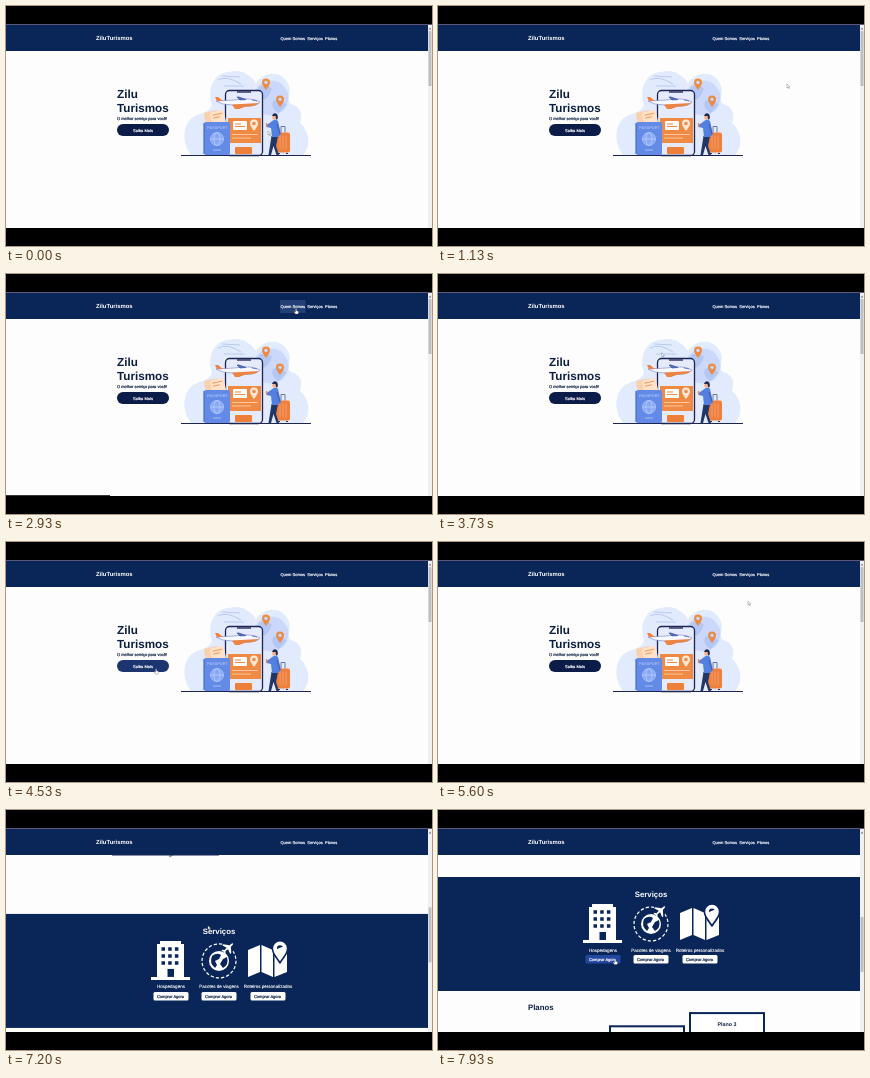
Animation, 426 px wide and 240 px high, one loop 8000 ms. Source, as an HTML page:

```html
<!DOCTYPE html>
<html lang="pt-BR">
<head>
<meta charset="utf-8">
<title>ZiluTurismos</title>
<style>
  html, body { margin: 0; height: 100%; overflow: hidden; background: #000; }
  svg { display: block; width: 100vw; height: 100vh; font-family: "Liberation Sans", Arial, sans-serif; text-rendering: geometricPrecision; }
  .b { font-weight: bold; }
  .mid { text-anchor: middle; }
  .navy { fill: #0a2558; }
  .ink { fill: #0c1f42; }
  .white { fill: #fff; }
  .line { fill: none; stroke: #1b2550; }
  .small { font-size: 4px; stroke-width: .18; }
  .small.ink, #about { stroke: #0c1f42; }
  .small.white { stroke: #fff; }
  .link rect { fill: transparent; }
  .link.hover rect { fill: #233f75; }
  .cta rect { fill: #0c1c48; }
  .cta.hover rect { fill: #1c3470; }
  .buy rect { fill: #fff; }
  .buy text { fill: #0c1f42; stroke: #0c1f42; }
  .buy.hover rect { fill: #23469f; }
  .buy.hover text { fill: #fff; stroke: #fff; }
</style>
</head>
<body>
<svg viewBox="0 0 426 240">
  <defs>
    <path id="pin" d="M0 6C-2 3-4 1-4-1.500A4 4 0 0 1 4-1.500C4 1 2 3 0 6ZM0-3.300A1.800 1.800 0 1 0 0 .300A1.800 1.800 0 1 0 0-3.300Z"/>
    <path id="jet" d="M0-7Q1.200-6 1-3L6 1V2.500L1 .800.700 4 2.500 5.500V6.500L0 5.800-2.500 6.500V5.500L-.700 4-1 .800-6 2.500V1L-1-3Q-1.200-6 0-7Z"/>
    <g id="case">
      <path d="M5 0V-6H9V0" fill="none" stroke="#555b73" stroke-width=".8"/>
      <rect width="14" height="20" rx="2"/>
      <path d="M4 3V17M7 3V17M10 3V17" stroke="#fff" stroke-opacity=".35" stroke-width=".7"/>
      <path d="M3 20.500V21.500M11 20.500V21.500" stroke="#263152" stroke-width="2"/>
    </g>
  </defs>

  <rect y="18" width="426" height="205" fill="#fdfdfd"/>

  <g id="page">
    <!-- hero -->
    <g class="b ink" font-size="11.7">
      <text x="111" y="92.300">Zilu</text>
      <text x="111" y="105.500">Turismos</text>
    </g>
    <text class="ink small" x="111" y="114">O melhor serviço para você!</text>
    <g class="cta" data-box="111 118 52 12">
      <rect x="111" y="118" width="52" height="12" rx="6"/>
      <text class="white mid small" x="137" y="125.500">Saiba Mais</text>
    </g>

    <g fill="#e1ebfd">
      <path d="M185 149C177 138 176 125 183 115C190 106 202 109 206 99C201 83 207 67 223 66C235 62 246 70 250 77C257 66 274 64 281 76C288 86 279 93 285 98C297 101 296 112 294 117C304 126 305 140 297 149Z"/>
      <circle cx="265" cy="92" r="17.500" fill="#cbd8f9"/>
      <path d="M253 81Q262 77 266 83Q263 91 258 94Q251 90 253 81ZM267 95Q275 92 280 99L273 107Q264 103 267 95Z" fill="#b3c7f5"/>
      <path d="M212 74Q221 69 235 78M216 70 234 71M218 80H238" fill="none" stroke="#8ea9e4" stroke-width=".5"/>
    </g>
    <rect x="219.500" y="84.500" width="37" height="65" rx="4" fill="#e6eafd"/>
    <path d="M222 112H255V137H222Z" fill="#ef8a45"/>
    <rect x="227" y="115" width="14" height="9" rx="1" class="white"/>
    <path d="M229 118H235M229 120.500H239" stroke="#ef8a45" stroke-width="1.200"/>
    <use href="#pin" x="248" y="119" fill="#fde6d3" fill-rule="evenodd"/>
    <path d="M226 128.500H252M226 132H245" stroke="#fbc6a0" stroke-width="1"/>
    <rect x="229" y="141" width="17" height="7" rx="1" fill="#ec8038"/>
    <rect class="line" x="219.500" y="84.500" width="37" height="65" rx="4" stroke-width="1.300"/>
    <path d="M231 86H245" class="line" stroke-width="1.300"/>
    <path d="M210 95 228 94Q246 91 254 96Q251 100 240 100.500L217 98Z" fill="#f7f8ff" stroke="#5871b4" stroke-width=".5"/>
    <path d="M226 98.500 253 97Q250 100.500 240 100.500L233 103 229 103ZM211 95 209 91 212 91 217 95Z" fill="#ec8244"/>
    <path d="M234 94 231 91 233 91 240 93.500ZM246 94 251 95" fill="#5871b4" stroke="#2c458e" stroke-width=".6"/>

    <g transform="rotate(-12 208 112)" fill="#fbd0aa">
      <rect x="199" y="105" width="14" height="17" rx="1"/>
      <rect x="205" y="106" width="14" height="17" rx="1" fill="#fde1c8"/>
      <path d="M207 109H217M207 112H214" stroke="#ec8c4c" stroke-width=".8"/>
    </g>
    <rect x="198" y="116" width="26" height="33" rx="2" fill="#628ae6"/>
    <path d="M198 117V148" stroke="#456bc4" stroke-width="1.200"/>
    <text class="mid" x="211.500" y="122.500" font-size="3.800" fill="#c9d8fc">PASSPORT</text>
    <g fill="none" stroke="#bfd2ff" stroke-width=".7">
      <circle cx="211" cy="133" r="6.500" fill="#87a8f2"/>
      <ellipse cx="211" cy="133" rx="3" ry="6.500"/>
      <path d="M204.500 133H217.500M207 144H215"/>
    </g>
    <g fill="#ec8b43" fill-rule="evenodd">
      <use href="#pin" x="260" y="78"/>
      <use href="#pin" x="274" y="95"/>
    </g>
    <use href="#case" x="270" y="126.500" fill="#ef7f3c"/>
    <path d="M265.500 130H272L270 140 273 149H270.500L267.500 140 265 149H262.500Z" fill="#223769"/>
    <path d="M265 116Q269 112 272 115L275 128 272 131H266L265 122 260.500 121 260.500 119Z" fill="#5380df"/>
    <path d="M271 118 274 128" stroke="#365fb8"/>
    <circle cx="268.500" cy="111.500" r="2.300" fill="#f1b092"/>
    <path d="M266 110Q267 106 271 108Q273 112 270.500 114L269.500 110Z" fill="#202a4c"/>
    <path d="M260.500 117V121" stroke="#ef8a45" stroke-width="1.200"/>
    <path class="line" d="M175 149.500H305"/>

    <!-- about, placed 150 below its on-screen position -->
    <g transform="translate(0 150)">
      <path d="M117 173Q110 158 123 146C134 140 129 127 142 121C159 111 177 119 185 127C204 130 216 151 209 173Z" fill="#e8f0fd"/>
      <path d="M157 115V147" stroke="#7e99c4" stroke-width=".7"/>
      <path d="M142 121H172V128H142ZM142 129.500H172V136.500H142Z" fill="#4c70ad"/>
      <path d="M144 124.500H160M144 133H163" stroke="#d7e5fb" stroke-width="1.500"/>
      <path d="M163 124.500H170M166 133H170" stroke="#f0a24d" stroke-width="1.300"/>
      <path d="M139 152V146Q144 140 150 146V152Z" fill="#3d78ce"/>
      <circle cx="144.500" cy="139" r="2.700" fill="#f0b194"/>
      <path d="M141.500 139Q142 134 147 136L147.500 139Z" fill="#c16233"/>
      <rect x="118" y="150" width="50" height="23" fill="#669ce5"/>
      <path d="M116 150.500H169" stroke="#2e5c9c" stroke-width="1.600"/>
      <path d="M128 156H162V169H128Z" fill="#4e87d6"/>
      <path d="M150 149V142H163V149Z" fill="#3a5c8c"/>
      <path d="M118 156H124.500L123.500 173H121.500L121 161 120 173H117.500Z" fill="#263452"/>
      <path d="M118 157V146Q121 141 124 146L128.500 151 127 152.500 123.500 150V157Z" fill="#f0a33f"/>
      <circle cx="121" cy="138.500" r="2.500" fill="#8b513c"/>
      <use href="#case" transform="translate(107 158) scale(.7)" fill="#e98442"/>
      <use href="#case" transform="translate(163 157) rotate(24) scale(.75)" fill="#82c473"/>
      <path d="M175 151H184L182 161 187 173H184.500L179 160 175.500 173H173Z" fill="#24355b"/>
      <path d="M175.500 152V142Q180 137 185 142L184.500 152ZM176 143 172 153 173 156 178 146Z" fill="#b83b42"/>
      <circle cx="180.500" cy="134" r="2.700" fill="#e9a47f"/>
      <path d="M178 134Q178 129 183.500 132L181 133Z" fill="#2c2d43"/>
      <path d="M189 155H197L196 162 200 172H198L193 162 191 173H188.500Z" fill="#34578f"/>
      <path d="M189 156V146Q193 142 197 147L202 143 203 144.500 197 151V157Z" fill="#f1c767"/>
      <circle cx="193" cy="140" r="2.500" fill="#edb091"/>
      <path d="M190 144Q189 136 194 137L195 139 192 140Z" fill="#4a2c34"/>
      <path class="line" d="M106 173.300H213" stroke-width=".7"/>
      <rect x="218" y="115" width="2" height="13" fill="#124a4d"/>
      <text class="b ink" x="221.700" y="122.600" font-size="7.800">Quem somos</text>
      <g id="about" font-size="3.900" stroke-width=".18"></g>
    </g>

    <!-- services and plans, placed 315 below their on-screen position -->
    <g transform="translate(0 315)">
      <rect class="navy" y="67" width="422" height="114"/>
      <text class="white b mid" x="213" y="87" font-size="7.800">Serviços</text>
      <g class="white">
        <path d="M151 97H154V94H175V97H178V130H184V133H145V130H151Z"/>
        <path d="M155.500 102H173M155.500 109H173M155.500 116H173" fill="none" stroke="#0a2558" stroke-width="3.500" stroke-dasharray="3.500 3.200"/>
        <path class="navy" d="M161.500 122H168V130H161.500Z"/>
        <circle cx="213" cy="114" r="17" fill="none" stroke="#fff" stroke-width="1.200" stroke-dasharray="3.300 2"/>
        <circle cx="213" cy="114" r="10"/>
        <path class="navy" d="M206 109Q211 105 215 108L213 112 209 114 211 118 209 121Q203 116 206 109ZM217 112 221 110Q223 118 217 121L214 117Z"/>
        <circle class="navy" cx="222" cy="101" r="6"/>
        <use href="#jet" transform="translate(222 101) rotate(48)"/>
        <path d="M242 103 254 98V125L242 130ZM255.500 98 267 103V130L255.500 125ZM268.500 103 281 98V125L268.500 130Z"/>
        <use href="#pin" class="navy" transform="translate(274 105) scale(2.050)"/>
        <use href="#pin" fill-rule="evenodd" transform="translate(274 104) scale(1.700)"/>
      </g>
      <g id="services"></g>
      <text class="b ink" x="90" y="200" font-size="7.800">Planos</text>
      <g id="plans" fill="#fff" stroke="#0a2558" stroke-width="2"></g>
    </g>
  </g>

  <rect class="navy" y="19" width="422" height="26"/>
  <text class="white b" x="90" y="34" font-size="5.900">ZiluTurismos</text>
  <g id="nav"></g>

  <rect x="422" y="19" width="4" height="204" fill="#f0f0f0"/>
  <path d="M424 21.500 425.300 23.500H422.700Z" fill="#777"/>
  <rect id="thumb" x="422.500" y="25" width="3" height="55" fill="#bfbfc1"/>
  <rect id="status" y="221" width="104" height="1" fill="#34363c"/>

  <path d="M0 0H426V18H0ZM0 222H426V240H0Z"/>
  <path d="M0 18.500H426" stroke="#5f567a"/>

  <g id="cursor" stroke-linejoin="round" fill="#fff" stroke="#555" stroke-width=".4">
    <path id="arrow" transform="scale(.8)" d="M0 0V5L1.200 4 2.100 5.900 2.900 5.500 2 3.700H3.600Z"/>
    <path id="hand" transform="scale(.85)" d="M-.500 0Q.200-.700.700 0V2.200L3 2.800V4.500L2.200 6H-.700L-2.200 3.500-1.500 3-.500 3.800Z"/>
  </g>
</svg>
<script>
const $ = id => document.getElementById(id);

$("about").innerHTML = [
  [136.3, "It is a long established fact that a reader will be"],
  [140.9, "distracted by the readable content of a page when"],
  [145.5, "looking at its layout."],
  [152.6, "The point of using Lorem Ipsum is that it has a more-"],
  [157.2, "or-less normal distribution of letters, as opposed to"],
  [161.8, "using 'Content here, content here', making it look like"],
  [166.4, "readable English."]
].map(([y, line]) => `<text x="218" y="${y}">${line}</text>`).join("");

$("services").innerHTML = [
  [165, "Hospedagens"], [213, "Pacotes de viagens"], [262, "Roteiros personalizados"]
].map(([x, name]) => `
  <text class="white mid" x="${x}" y="141.5" font-size="4.5" stroke="#fff" stroke-width=".12">${name}</text>
  <g class="buy" data-box="${x - 17.5} 460 35 9">
    <rect x="${x - 17.5}" y="145" width="35" height="8.5" rx="1.5"/>
    <text class="mid small" x="${x - 0.5}" y="150.8">Comprar Agora</text>
  </g>`).join("");

$("plans").innerHTML = [0, 1, 2].map(i => {
  const x = 92 + 80 * i, y = 229.5 - 13.2 * i;
  return `<rect x="${x}" y="${y}" width="74" height="100"/>
    <text class="b ink mid" x="${x + 37}" y="${y + 12.5}" font-size="5.3" stroke="none">Plano ${i + 1}</text>`;
}).join("");

$("nav").innerHTML = [
  [274.5, 25, "Quem Somos"], [301.3, 16, "Serviços"], [319, 13, "Planos"]
].map(([x, w, label]) => `
  <g class="link" data-fixed="1" data-box="${x - 0.5} 26 ${w + 0.5} 13">
    <rect x="${x - 0.5}" y="26" width="${w + 0.5}" height="13"/>
    <text class="white small" x="${x}" y="34">${label}</text>
  </g>`).join("");

const hotspots = [...document.querySelectorAll("[data-box]")].map(el => ({
  el, fixed: el.dataset.fixed, box: el.dataset.box.split(" ").map(Number)
}));

const LOOP = 8000;
// Each key is [time, ...values].
const cursorPath = [
  [0, 262, 125], [300, 262, 125], [1000, 349, 78], [1500, 349, 78],
  [2500, 290, 35], [3200, 290, 35], [4300, 150, 127], [4750, 150, 127],
  [5500, 310, 59], [5750, 310, 59], [6300, 212, 102], [6900, 212, 102],
  [7750, 177, 149.5], [LOOP, 177, 149.5]
];
const scrollPath = [[0, 0], [5750, 0], [6300, 150], [6750, 150], [7400, 315], [LOOP, 315]];

function sample(keys, t) {
  const i = keys.findIndex(key => key[0] > t);
  const [t0, ...from] = keys[i - 1], [t1, ...to] = keys[i];
  const u = (t - t0) / (t1 - t0), k = u * u * (3 - 2 * u);
  return from.map((v, j) => v + (to[j] - v) * k);
}

function draw() {
  const t = performance.now() % LOOP;
  const [x, y] = sample(cursorPath, t);
  const [scroll] = sample(scrollPath, t);
  let active = null;
  for (const { el, fixed, box: [bx, by, w, h] } of hotspots) {
    const top = fixed ? by : by - scroll;
    const over = x >= bx && x <= bx + w && y >= top && y <= top + h;
    el.classList.toggle("hover", over);
    if (over) active = el;
  }
  $("page").setAttribute("transform", `translate(0 ${-scroll})`);
  $("thumb").setAttribute("y", 25 + scroll * 0.26);
  $("cursor").setAttribute("transform", `translate(${x} ${y})`);
  $("arrow").style.display = active ? "none" : "";
  $("hand").style.display = active ? "" : "none";
  $("status").style.display = active && active.dataset.fixed ? "" : "none";
  requestAnimationFrame(draw);
}
draw();
</script>
</body>
</html>
```
